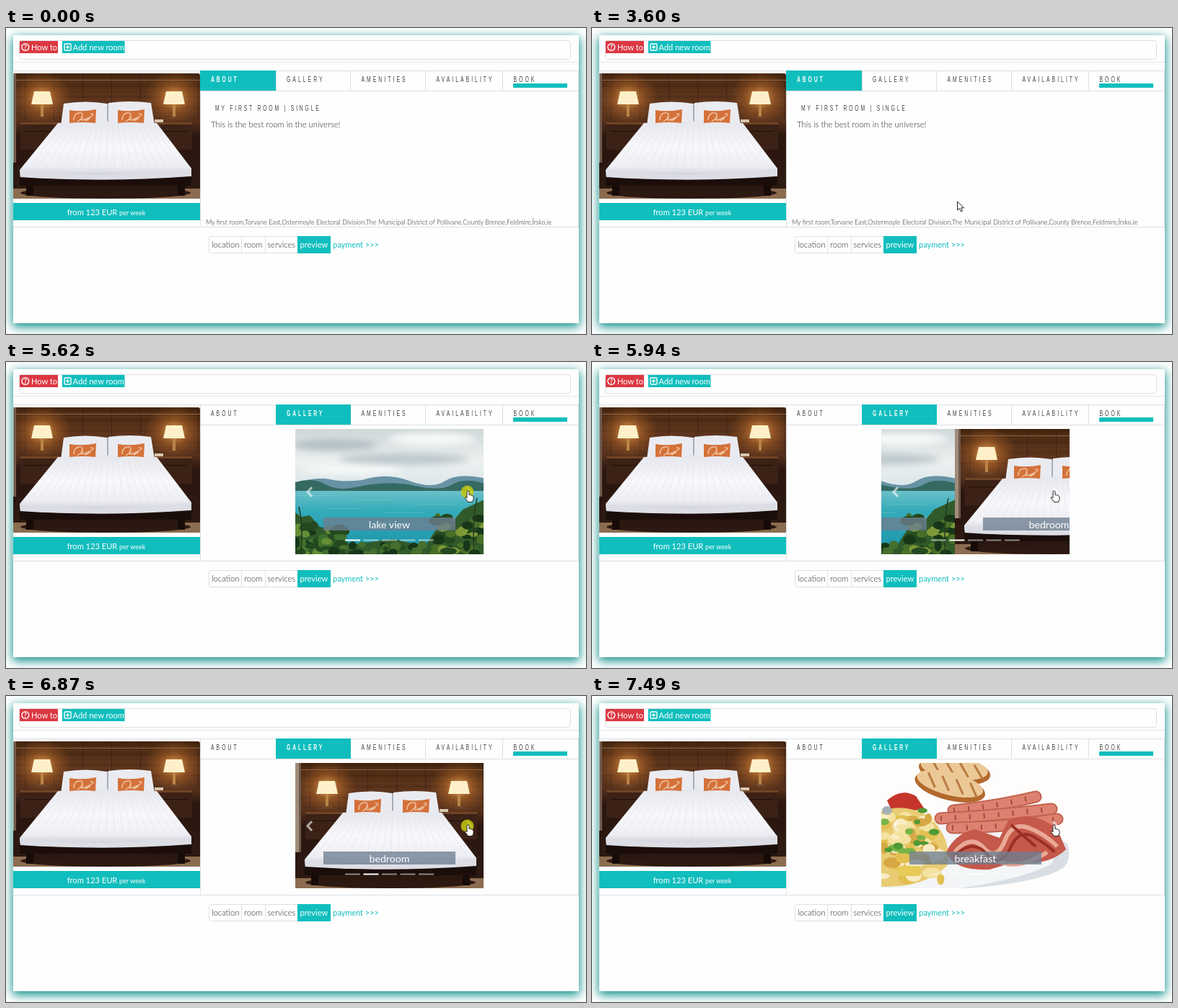
These frames come from a looping animation (804x425 px, 8000 ms). An HTML page:

```html
<!DOCTYPE html>
<html lang="en">
<head>
<meta charset="utf-8">
<title>Room preview</title>
<style>
  html, body { margin: 0; width: 100%; height: 100%; overflow: hidden; background: #fff; }
  .card { position: absolute; left: 10px; top: 10px; width: 784px; height: 400px; background: #fefefe; box-shadow: 0 4px 13px 1px #0f8f89; }
  svg { position: absolute; left: 0; top: 0; width: 804px; height: 425px; }
  text { font: 300 11.3px Lato, sans-serif; fill: #23282c; white-space: pre; }
  .condensed { font: 400 11px "Liberation Sans", Arial, sans-serif; letter-spacing: 4.9px; fill: #45413b; }
  .on { font-weight: 700; letter-spacing: 4.6px; fill: #fff; }
  .white { fill: #fff; font-weight: 400; font-size: 11.1px; }
  .small { font-size: 9.04px; }
  .line { fill: none; stroke: #dcdfe1; }
</style>
</head>
<body>
<div class="card"></div>
<svg id="stage" viewBox="0 0 804 425"></svg>
<script>
const TEAL = '#10bebd', LOOP = 8000, SLIDE_W = 261;

const rect = (x, y, w, h, fill, extra = '') => `<rect x="${x}" y="${y}" width="${w}" height="${h}" fill="${fill}" ${extra}/>`;
const path = (d, fill, extra = '') => `<path d="${d}" fill="${fill}" ${extra}/>`;
const stroke = (d, color, width, extra = '') => path(d, 'none', `stroke="${color}" stroke-width="${width}" ${extra}`);
const ellipse = (x, y, rx, ry, fill, extra = '') => `<ellipse cx="${x}" cy="${y}" rx="${rx}" ry="${ry}" fill="${fill}" ${extra}/>`;
const label = (x, y, text, extra = '') => `<text x="${x}" y="${y}" ${extra}>${text}</text>`;
const condensed = (x, y, text, extra = 'class="condensed"') =>
  `<text transform="translate(${x} ${y}) scale(.62 1)" ${extra}>${text}</text>`;
const repeat = (n, draw) => Array.from({ length: n }, (_, i) => draw(i)).join('');

function seeded(seed) {
  return () => (seed = (seed * 16807) % 2147483647) / 2147483647;
}

function scatter(n, seed, [x, y, w, h], size, colors) {
  const rnd = seeded(seed);
  return repeat(n, () => ellipse(x + rnd() * w, y + rnd() * h, size * (.5 + rnd()), size * (.4 + rnd() * .6),
    colors[Math.floor(rnd() * colors.length)]));
}

const gradient = (id, stops) => `<linearGradient id="${id}" x2="0" y2="1">${
  stops.map(([at, color]) => `<stop offset="${at}" stop-color="${color}"/>`).join('')}</linearGradient>`;

const defs = `<defs>
  ${gradient('wall', [[0, '#45260f'], [.2, '#5c341c'], [.38, '#55301b'], [.5, '#2b1710'], [1, '#2b1710']])}
  ${gradient('sheet', [[0, '#e6e7ed'], [.45, '#f8f8fb'], [.8, '#eeeff4'], [1, '#c9cad3']])}
  ${gradient('sky', [[0, '#cfd7d9'], [.5, '#edf0ef'], [1, '#d5e3e8']])}
  ${gradient('water', [[0, '#6cc0c8'], [.3, '#35acba'], [1, '#1993a8']])}
  <radialGradient id="glow"><stop stop-color="#ffb95c" stop-opacity=".9"/><stop offset=".5" stop-color="#c0702c" stop-opacity=".45"/><stop offset="1" stop-color="#a05a24" stop-opacity="0"/></radialGradient>
  <filter id="soft"><feGaussianBlur stdDeviation="5"/></filter>
  <clipPath id="photo"><path d="M10 63H266a3 3 0 0 1 3 3V234a3 3 0 0 1-3 3H10z"/></clipPath>
  <clipPath id="frame">${rect(401, 93, SLIDE_W, 174, '#000')}</clipPath>
  <clipPath id="slide">${rect(0, 0, SLIDE_W + 3, 174, '#000')}</clipPath>
</defs>`;

const lamp = x => ellipse(x, 34, 42, 38, 'url(#glow)') +
  path(`M${x - 11} 25h22l4 18h-30z`, '#fff0c9') + rect(x - 2, 43, 4, 18, '#b98547') + rect(x - 7, 60, 14, 3, '#6d4526');

const cushion = x => path(`M${x} 51q18 3 37-1l-1 19q-18-2-36 0z`, '#d4713a') +
  stroke(`M${x + 6} 65q0-9 7-10t4 6 9 1 3-6M${x + 11} 67l8-6M${x + 22} 66l7-4`, '#efc3a0', 1.5);

const nightstand = x => rect(x, 68, 54, 38, '#3c2116') + rect(x, 68, 54, 3, '#704426') + rect(x + 6, 80, 42, 1, '#1e0f0a');

const bed = () => rect(0, 0, 264, 174, 'url(#wall)') +
  repeat(12, i => rect(0, i * 5 + 2, 264, 1.5, i % 3 ? '#6b4024' : '#371c0e', 'opacity=".3"')) +
  repeat(7, i => rect(i * 40 + 20, 0, 1, 64, '#2f190f', 'opacity=".6"')) + rect(8, 9, 256, 1, '#8b6548') +
  lamp(44) + lamp(227) +
  rect(0, 0, 8, 124, '#a08c7b') + rect(5, 0, 3, 124, '#6e5a4c') +
  nightstand(14) + nightstand(198) + rect(200, 64, 12, 4, '#d9c7b2') +
  path('M0 134L40 106H230L264 126V174H0z', '#2c1911') + path('M0 160H264V174H0z', '#8c6c50') +
  ellipse(132, 166, 118, 8, '#2c1911') +
  path('M74 42q30-5 60 0v30H70zM136 41q30-4 59 0l5 31h-64z', '#eaebf1') +
  stroke('M135 42v28', '#aaabb8', 2) +
  path('M66 69Q135 64 203 69L251 132L250 145H14L13 134z', 'url(#sheet)') +
  repeat(19, i => stroke(`M${70 + i * 7.2} 74L${17 + i * 12.8} 142`, '#e0e1e8', .6)) +
  path('M13 134q60 8 119 7t119-9v12q-60 4-120 4T14 145z', '#dddee5') +
  cushion(82) + cushion(149) +
  path('M13 144q118 8 238-1v13H13z', '#1b0e0a') + path('M24 156H240l-6 7H30z', '#2a1710') +
  rect(22, 156, 10, 14, '#170b08') + rect(232, 156, 10, 14, '#170b08');

const lake = () => rect(0, 0, 264, 90, 'url(#sky)') +
  `<g filter="url(#soft)">${ellipse(55, 22, 60, 8, '#b4c0c4')}${ellipse(190, 14, 60, 8, '#f9faf9')}${ellipse(150, 42, 90, 8, '#bcc8cc')}${ellipse(80, 56, 70, 6, '#f8faf9')}</g>` +
  path('M0 75Q30 66 48 70T92 71Q126 60 158 72T208 72T264 69V92H0z', '#6793a4') +
  path('M0 74Q24 67 42 77T88 80Q130 71 166 79T218 77T264 76V92H0z', '#356a63') +
  rect(0, 86, 264, 88, 'url(#water)') +
  repeat(9, i => rect((i * 83) % 210, 92 + i * 6, 56, .7, '#8ed0d4', 'opacity=".45"')) +
  path('M0 116l8 6 12-2 14 16 24 5 18 20 60-8 44 10 18-28 20-6 14-17 32-15V174H0z', '#315a2b') +
  scatter(45, 17, [0, 134, 66, 40], 8, ['#244920', '#3f702e', '#658d36', '#173618']) +
  scatter(28, 49, [66, 160, 130, 14], 6, ['#244920', '#456f2d', '#173618']) +
  scatter(55, 91, [196, 122, 66, 52], 8, ['#244920', '#486f28', '#7d9938', '#173618']) +
  stroke('M7 174Q12 140 5 108M248 174Q245 125 252 96', '#243a1c', 1.5);

const sausage = d => stroke(d, '#c26350', 17, 'stroke-linecap="round"') + stroke(d, '#dd8270', 13, 'stroke-linecap="round"') +
  stroke(d, '#a5483a', 7, 'stroke-dasharray="2 18"');

const toast = (x, y, angle) => `<g transform="translate(${x} ${y}) rotate(${angle})">` +
  ellipse(0, 3, 50, 19, '#b4682c') + ellipse(-1, -1, 47, 16, '#ecc897') +
  repeat(4, i => stroke(`M${i * 20 - 34} -9l14 18`, '#b77b40', 3)) + '</g>';

const breakfast = () => rect(0, 0, 264, 174, '#fefdfc') +
  path('M0 174H120Q220 166 252 146Q264 136 258 112L200 84H0z', '#d9dee4') +
  path('M0 174H110Q200 160 236 140L252 105 200 80H0z', '#f3f5f7') +
  toast(102, 8, 8) + toast(96, 30, 14) +
  sausage('M100 66Q160 60 214 47') + sausage('M82 77Q150 74 236 64') + sausage('M98 90Q165 90 244 78') +
  path('M8 52Q28 34 48 46L60 64 16 70z', '#c6352c') +
  path('M0 68Q30 54 66 74Q98 104 92 142Q60 174 0 172z', '#e8cb73') +
  scatter(60, 33, [0, 72, 84, 92], 9, ['#f4e2a0', '#e3bf52', '#f8ecc4', '#d6a845']) +
  scatter(14, 71, [4, 58, 84, 70], 6, ['#4f9a34', '#78b445']) +
  path('M90 124Q102 98 130 92L164 104 176 80Q210 64 244 92L256 120Q232 144 184 138L150 148Q100 150 90 124z', '#c5594a') +
  stroke('M102 124Q124 98 142 118T172 106Q182 82 204 90T244 116M112 138Q136 116 160 134T230 124', '#eaa997', 6) +
  stroke('M100 130Q126 104 146 126T180 116Q192 90 214 104T240 124M180 86l34 30', '#9d2f26', 4) +
  rect(24, 143, 30, 14, '#e7cb57', 'rx="3"') + ellipse(8, 66, 7, 6, '#a4b0b4');

const caption = text => rect(39, 123, 183, 18, '#6d7f91', 'opacity=".78"') +
  label(130.5, 138, text, 'class="white" style="font-size:14.2px" text-anchor="middle"');
const slides = [[lake, 'lake view'], [bed, 'bedroom'], [breakfast, 'breakfast']];

const tabs = [['ABOUT', 269, 105], ['GALLERY', 374, 104], ['AMENITIES', 477.5, 104], ['AVAILABILITY', 581.5, 107], ['BOOK', 688.5, 105]];
const tabRow = active => rect(tabs[active][1], 59, tabs[active][2], 28, TEAL) +
  tabs.map(([name, x], i) => condensed(x + 15, 75, name, `class="condensed ${i === active ? 'on' : ''}"`)).join('');

const page =
  rect(18.5, 17.5, 764, 26, 'none', 'class="line" rx="3"') + stroke('M10 47.5H794', '#e1e4e6', 1) +
  rect(19, 18, 53, 17, '#dc3842') + rect(78, 18, 86.5, 17, TEAL) +
  `<circle cx="26.8" cy="26.5" r="4.9" fill="none" stroke="#fff" stroke-width="1.4"/>` +
  label(26.8, 29.8, '?', 'class="white" style="font-size:9px;font-weight:700" text-anchor="middle"') +
  label(35, 30.5, 'How to', 'class="white"') +
  rect(81, 22, 9, 9, 'none', 'stroke="#fff" stroke-width="1.4" rx="1"') + stroke('M83 26.5h5M85.5 24v5', '#fff', 1.4) +
  label(92.5, 30.5, 'Add new room', 'class="white"') +
  rect(10, 59.5, 783.5, 217, 'none', 'class="line"') +
  stroke('M269.5 60V276M269 87.5H794M374.5 60V87M477.5 60V87M581.5 60V87M688.5 60V87', '#dcdfe1', 1) +
  `<g clip-path="url(#photo)"><g transform="translate(6 63)">${bed()}</g></g>` +
  rect(10, 243, 259, 24, TEAL) +
  label(139, 259.5, 'from 123 EUR <tspan class="small">per week</tspan>', 'class="white" text-anchor="middle"') +
  rect(281.5, 289.5, 168, 23, '#fff', 'stroke="#dcdfe1" rx="3"') + stroke('M326.5 290V313M359.5 290V313', '#dcdfe1', 1) +
  rect(404, 289, 46, 24, TEAL) +
  label(285, 305, 'location') + label(330, 305, 'room') + label(362.3, 305, 'services') +
  label(407.5, 305, 'preview', 'class="white"') +
  label(453, 304.5, 'payment &gt;&gt;&gt;', `style="fill:${TEAL};font-weight:400;font-size:11px"`);

const about = tabRow(0) + condensed(290, 114.5, 'MY FIRST ROOM | SINGLE', 'class="condensed" style="letter-spacing:4.5px"') +
  label(284, 137.5, 'This is the best room in the universe!') +
  label(277, 273, 'My first room,Torvane East,Ostermoyle Electoral Division,The Municipal District of Pollivane,County Brenoe,Feldmire,Írsko,ie', 'class="small"');

const gallery = tabRow(1) + `<g id="pictures"><g clip-path="url(#frame)">${
  slides.map(([draw, text]) => `<g class="slide"><g clip-path="url(#slide)">${draw()}${caption(text)}</g></g>`).join('')}</g>` +
  stroke('M424 174l-6 6.500 6 6.500M639 174l6 6.500-6 6.500', '#fff', 3, 'opacity=".6"') +
  repeat(5, i => rect(470 + i * 25.5, 246.5, 21, 2, '#fff', 'class="dot"')) + '</g>';

const cursor = `<g id="cursor"><circle id="ring" cx="-1" cy="1" r="9" fill="#c3c70e" opacity=".85"/>
  ${path('M0 0V12L3 9.500 5 14 7 13 5 8.800H9z', '#fff', 'id="arrow" stroke="#222" stroke-width="1"')}
  ${path('M-1.500 1Q-1.500-.5 0-.5T1.500 1V5Q3 4 4 5.500Q5.500 5 6 6.500Q7.500 6.500 7.500 8V11L6 15H0L-4 9.500Q-4.500 8-3 8L-1.500 9.500z', '#fff', 'id="hand" stroke="#222" stroke-width="1"')}</g>`;

const stage = document.getElementById('stage');
stage.innerHTML = defs + page + `<g id="about">${about}</g><g id="gallery">${gallery}</g>` + rect(703, 77, 75, 6, TEAL) + cursor;

const el = id => document.getElementById(id);
const slideEls = [...stage.querySelectorAll('.slide')], dots = [...stage.querySelectorAll('.dot')];
const show = (node, visible) => { node.style.display = visible ? '' : 'none'; };

const moves = [
  { from: 760, to: 1700, steps: [[698, 369], [635, 300], [550, 220], [430, 150], [320, 95], [267, 66], [290, 68]] },
  { from: 1870, to: 2810, steps: [[331, 67], [360, 70], [394, 78], [403, 100], [403, 130], [402, 150], [402, 157]] },
  { from: 2960, to: 3900, steps: [[400, 180], [430, 250], [465, 284], [495, 270], [506.5, 241], [455, 140], [413, 72]] },
  { from: 4680, to: 5620, steps: [[425, 85], [460, 110], [510, 140], [560, 170], [610, 192], [638, 197], [640.5, 179.5]] }
];
// Distance still to travel for the incoming picture.
const swaps = [
  { from: 5770, to: 6410, steps: [227, 102, 31, 3, 0] },
  { from: 6870, to: 7490, steps: [SLIDE_W, 243, 105, 30, 0] }
];

function stepAt({ from, to, steps }, t) {
  const i = Math.floor((t - from) / (to - from) * (steps.length - 1) + .1);
  return steps[Math.min(i, steps.length - 1)];
}
const between = (t, a, b) => t >= a && t < b;

function render(t) {
  const open = t >= 4070;
  show(el('about'), !open);
  show(el('gallery'), open);
  el('pictures').style.opacity = t < 4220 ? .5 : 1;

  const current = swaps.filter(s => t >= s.from).length;
  const left = current ? stepAt(swaps[current - 1], t) : 0;
  slideEls.forEach((node, i) => {
    show(node, i === current || i === current - 1);
    node.setAttribute('transform', `translate(${401 + left + (i - current) * SLIDE_W} 93)`);
  });
  const activeDot = left < SLIDE_W ? current : current - 1;
  dots.forEach((dot, i) => dot.setAttribute('opacity', i === activeDot ? 1 : .5));

  const move = moves.filter(m => t >= m.from).pop();
  show(el('cursor'), move);
  if (!move) return;
  const [x, y] = stepAt(move, t), overLink = y < 88 || x > 630 && y < 200;
  el('cursor').setAttribute('transform', `translate(${x} ${y})`);
  show(el('hand'), overLink);
  show(el('arrow'), !overLink);
  show(el('ring'), between(t, 3900, 4070) || between(t, 5620, 5770) || between(t, 6870, 7020));
}

const start = performance.now();
function tick() {
  render((performance.now() - start) % LOOP);
  requestAnimationFrame(tick);
}
tick();
</script>
</body>
</html>
```
